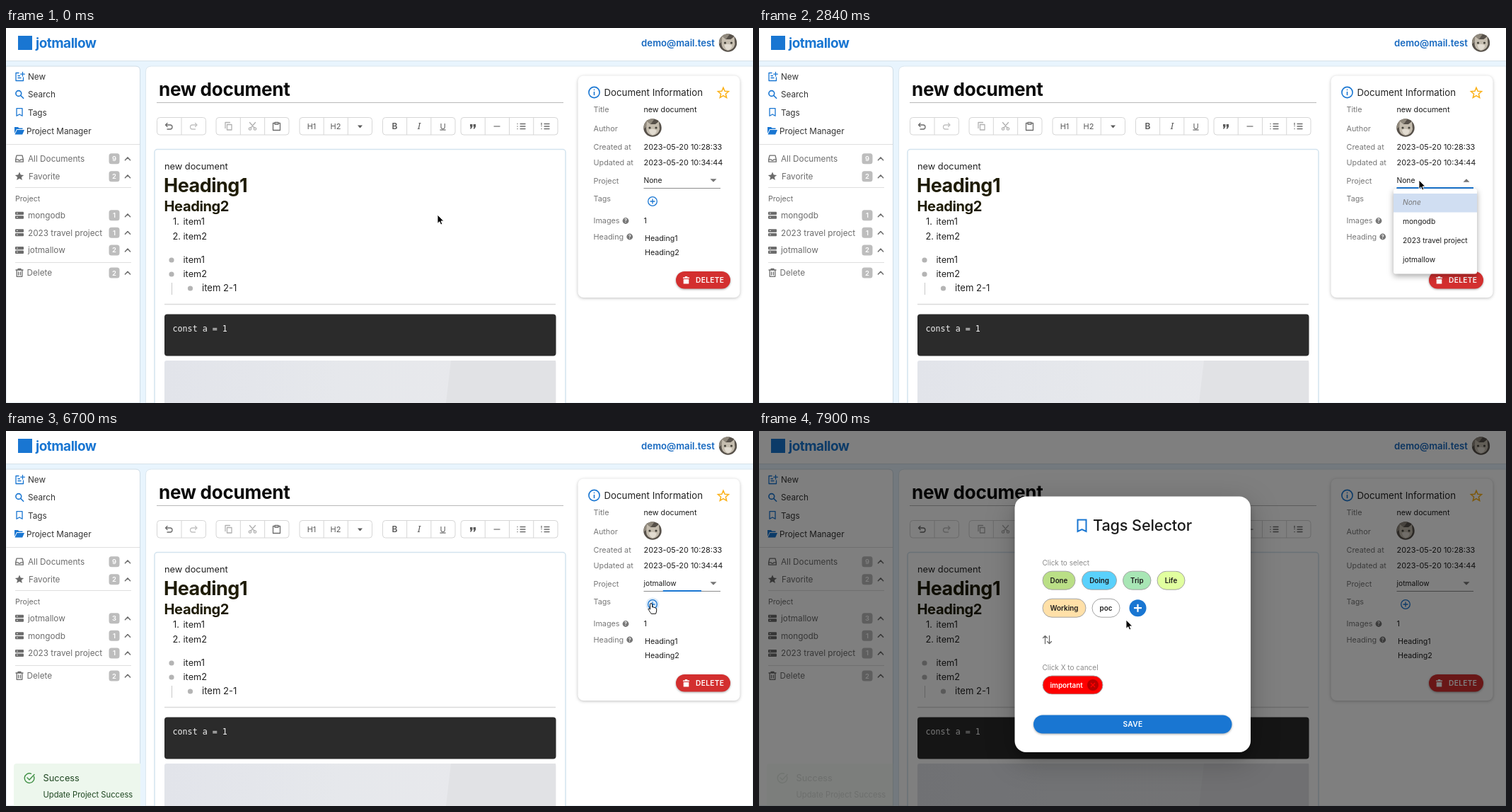
An HTML page that plays this animation: 1056 by 530 pixels, repeating every 8000 ms.

```html
<!DOCTYPE html>
<html lang="en">
<head>
<meta charset="utf-8">
<title>Document editor</title>
<style>
html, body { margin: 0; width: 100%; height: 100%; overflow: hidden; background: #fff; }
svg { display: block; font-family: Inter, "Open Sans", sans-serif; }
.b { font-weight: 700; }
.s { font-weight: 600; }
.side { font-size: 11.75px; fill: #333; }
.dim { fill: #6c6c6c; }
.body { font-size: 12.8px; fill: #222; }
.label { font-size: 10.8px; fill: #777; }
.value { font-size: 10.7px; fill: #1c1c1c; }
.date { font-size: 10.9px; }
.opt { font-size: 10.25px; fill: #1c1c1c; }
.hint { font-size: 10px; fill: #8b8b8b; }
.caps { font-size: 10.2px; font-weight: 600; fill: #fff; letter-spacing: .3px; }
.tool { font-size: 11px; fill: #5a5a5a; }
.line { fill: none; stroke: currentColor; stroke-width: 1.3; stroke-linecap: round; stroke-linejoin: round; }
.blue { color: #1976d2; }
.grey { color: #6c6c6c; }
.mid { text-anchor: middle; }
.lift { filter: drop-shadow(0 1px 1.5px rgba(0,0,0,.35)); }
.card { filter: drop-shadow(0 1px 2px rgba(0,0,0,.25)); }
#caret { transform-origin: 1000px 215.5px; }
#focusLine { transform-origin: 956px 226px; }
#sheet { filter: drop-shadow(0 7px 5px rgba(0,0,0,.2)) drop-shadow(0 10px 20px rgba(0,0,0,.24)); }
#paper { filter: drop-shadow(0 3px 4px rgba(0,0,0,.35)); }
</style>
</head>
<body>
<svg id="stage" width="1056" height="530" viewBox="0 0 1056 530">
  <defs>
    <clipPath id="disc"><circle r="12.7"/></clipPath>
    <linearGradient id="photo"><stop stop-color="#e2e4ea"/><stop offset=".45" stop-color="#e6e8ec"/><stop offset="1" stop-color="#e9e9ec"/></linearGradient>
    <g id="cat" clip-path="url(#disc)">
      <rect x="-13" y="-13" width="26" height="26" fill="#57514a"/>
      <path d="M-13-13H3L-2-6L-13 2Z" fill="#8f887c"/>
      <path d="M-8-9L-3-5H4L9-9L10 2Q8 10 0 11Q-9 9-9 1Z" fill="#c4bcae"/>
      <path d="M-5 3Q1 0 6 4Q4 10 0 10Q-4 9-5 3Z" fill="#e2dcd1"/>
      <circle cx="-4" cy="0" r="1.6" fill="#45423a"/><circle cx="5" cy="0" r="1.6" fill="#45423a"/>
    </g>
    <g id="stack" fill="#6c6c6c"><rect x="-6" y="-5" width="12" height="4.4" rx="1"/><rect x="-6" y=".6" width="12" height="4.4" rx="1"/><path d="M-4-2.8h1.6M-4 2.8h1.6" stroke="#fff"/></g>
    <g id="tray" class="line grey"><path d="M-5.3 1L-4-4.5H4L5.3 1V4.5H-5.3ZM-5.3 1.2H-2Q0 4 2 1.2H5.3"/></g>
    <path id="fav" d="M0-6.2L1.8-2.1L6.2-1.8L2.8 1.1L3.9 5.4L0 3.1L-3.9 5.4L-2.8 1.1L-6.2-1.8L-1.8-2.1Z" fill="#6c6c6c"/>
    <g id="bin" class="line grey"><path d="M-5-4H5M-2-4.2V-5.5H2V-4.2M-3.8-3.8V5.3H3.8V-3.8M-1.4-1V3M1.4-1V3"/></g>
    <path id="up" class="line grey" d="M-3.6 2L0-1.8L3.6 2" style="stroke-width:1.5"/>
    <path id="mark" class="line" d="M-4-5.3H4V5.3L0 3L-4 5.3Z"/>
    <g id="help"><circle r="4.4" fill="#777"/><text class="b mid" y="2.5" font-size="7" fill="#fff">?</text></g>
  </defs>

  <rect width="1056" height="530" fill="#e8f4fd"/>
  <rect width="1056" height="46" fill="#fff"/>
  <path d="M0 46.5H1056" stroke="#d7e2ea"/>
  <rect x="17" y="11" width="20" height="20" fill="#1976d2"/>
  <text class="b" x="42" y="28" font-size="19" letter-spacing="-.5" fill="#1976d2">jotmallow</text>
  <text class="s" x="1002" y="26" font-size="13.2" text-anchor="end" fill="#1769c0">demo@mail.test</text>
  <use href="#cat" x="1020.5" y="21"/>

  <path d="M0 54H183Q189.5 54 189.5 60V530H0Z" fill="#fff" stroke="#cfdce6"/>
  <g class="line blue">
    <path d="M18 63.5H14V74.5H24.5V70M17 70.5H21M17 67.5H19.5M23.5 62.5V68M20.7 65.2H26.3"/>
    <g style="stroke-width:1.6"><circle cx="17.8" cy="92.5" r="3.9"/><path d="M20.8 95.5L24.6 99.3"/></g>
    <use href="#mark" x="19" y="119"/>
  </g>
  <path d="M12 140H17L18.5 141.5H23.5V143H15L12 149ZM15.5 144H26L23.2 150.5H12.5Z" fill="#1976d2"/>
  <g class="side">
    <text x="31" y="73">New</text><text x="31" y="98">Search</text>
    <text x="31" y="123.5">Tags</text><text x="29" y="149.5">Project Manager</text>
  </g>
  <path d="M0 164.5H189M13 225.5H177M13 331.5H177" stroke="#dfdfdf"/>
  <text x="13" y="244.5" font-size="10.6" fill="#6c6c6c">Project</text>
  <g id="rows"></g><g id="listA"></g><g id="listB"></g>

  <path d="M197.5 530V62Q197.5 54 205.5 54H1056V530Z" fill="#fff" stroke="#dbe7ef"/>
  <text class="b" x="216" y="96" font-size="26.1" letter-spacing="-.3" fill="#0a0a0a">new document</text>
  <path d="M213 105.5H788" stroke="#b9b9b9"/>
  <g id="tools" fill="#fff" stroke="#d6d6d6"></g>
  <g class="line grey">
    <path d="M228 134.5L225.5 137L228 139.5M225.8 137H232Q235 137 235 140T232 143H228"/>
    <path stroke="#c2c2c2" style="stroke:#c2c2c2" d="M267.5 134.5L270 137L267.5 139.5M269.7 137H263.5Q260.5 137 260.5 140T263.5 143H267.5"/>
    <g stroke="#b0b0b0"><path d="M312.5 136.5H319V144H312.5ZM310 141.5V133.5H316.5"/>
    <path d="M344.5 133.5L351 141M352.5 133.5L346 141"/><circle cx="345" cy="142.5" r="1.7"/><circle cx="352" cy="142.5" r="1.7"/></g>
    <path d="M380 134.5H377.5V144.5H387.5V134.5H385M380 133.5H385V136H380Z"/>
    <path d="M690 139H698" stroke="#8a8a8a"/>
    <path d="M727 135.5H734M727 139H734M727 142.5H734M723 135.5h.1M723 139h.1M723 142.5h.1M761 135.5H768M761 139H768M761 142.5H768M757 134.5V136.5M757 138.5h.1M757 142.5h.1"/>
  </g>
  <path d="M497 137.5H504L500.5 141.5Z" fill="#5a5a5a"/>
  <g class="tool mid">
    <text x="432" y="143">H1</text><text x="466" y="143">H2</text>
    <text class="s" x="549.5" y="143" font-size="12">B</text>
    <text x="584" y="143" font-family="Noto Serif, serif" font-style="italic" font-size="12">I</text>
    <text x="617.5" y="142.5" text-decoration="underline">U</text>
  </g>
  <path d="M656 136h3.4v3.4l-1.8 3h-1.6l1-2.8h-1zM660.7 136h3.4v3.4l-1.8 3h-1.6l1-2.8h-1z" fill="#5a5a5a"/>

  <rect x="210" y="171.5" width="581" height="380" rx="4" fill="#fff" stroke="#d3e3ee" stroke-width="1.5"/>
  <g class="body">
    <text x="224" y="200">new document</text>
    <text x="236" y="278">1.</text><text x="250.5" y="278">item1</text>
    <text x="235.5" y="298.5">2.</text><text x="250.5" y="298.5">item2</text>
    <text x="250.5" y="332">item1</text><text x="250.5" y="352">item2</text><text x="277" y="372" font-size="13.1">item 2-1</text>
  </g>
  <g class="b" fill="#1f1c07">
    <text x="223" y="231.5" font-size="27" letter-spacing="-.5">Heading1</text>
    <text x="223.5" y="258.5" font-size="20.1" letter-spacing="-.4">Heading2</text>
  </g>
  <g fill="#b4b4b4"><circle cx="234" cy="328" r="3.6"/><circle cx="234" cy="348" r="3.6"/><circle cx="260.5" cy="368" r="3.6"/></g>
  <path d="M234.5 360V377" stroke="#c9c9c9"/>
  <path d="M224 390.5H777" stroke="#dadada" stroke-width="1.5"/>
  <rect x="224" y="404.5" width="553.5" height="59" rx="4" fill="#2b2b2b"/>
  <text x="235.5" y="429" font-family="DejaVu Sans Mono, monospace" font-size="11.7" fill="#f2f2f2">const a = 1</text>
  <path d="M224 530V473Q224 470 227 470H774Q777.5 470 777.5 473V530Z" fill="url(#photo)"/>
  <path d="M629 470H777V530H622Z" fill="#e1e2e5"/>

  <rect class="card" x="808.5" y="67.5" width="229" height="313.5" rx="8" fill="#fff"/>
  <g class="line blue" style="stroke-width:1.6"><circle cx="831.5" cy="91" r="7.6"/><path d="M831.5 90.5V94.5M831.5 87.3v.1"/></g>
  <text x="845.5" y="96" font-size="13.25" fill="#222">Document Information</text>
  <path d="M1014 84.3L1016.1 89.3L1021.5 89.7L1017.4 93.2L1018.7 98.5L1014 95.7L1009.3 98.5L1010.6 93.2L1006.5 89.7L1011.9 89.3Z" fill="none" stroke="#fbb117" stroke-width="1.5"/>
  <g class="label">
    <text x="830.5" y="119">Title</text><text x="830.5" y="145.5">Author</text><text x="830.5" y="172">Created at</text>
    <text x="830.5" y="194">Updated at</text><text x="830.5" y="219.5">Project</text><text x="830.5" y="245">Tags</text>
    <text x="830.5" y="276">Images</text><text x="830.5" y="298.5">Heading</text>
  </g>
  <use href="#help" x="876" y="272.5"/><use href="#help" x="881.7" y="295"/>
  <use href="#cat" x="914" y="141"/>
  <g class="value">
    <text x="901.5" y="119">new document</text><text class="date" x="901.5" y="172">2023-05-20 10:28:33</text>
    <text class="date" x="901.5" y="194">2023-05-20 10:34:44</text><text x="901.5" y="276">1</text>
    <text x="903" y="301">Heading1</text><text x="903" y="321">Heading2</text>
  </g>
  <rect id="focusFill" x="901.5" y="205" width="108.5" height="21" fill="#efefef"/>
  <path d="M901.5 226.5H1010" stroke="#8c8c8c"/>
  <path id="focusLine" d="M901.5 226H1010" stroke="#1976d2" stroke-width="1.8"/>
  <path id="caret" d="M995.5 213.2H1004.5L1000 217.8Z" fill="#757575"/>
  <text id="valueA" class="opt" x="901.5" y="219">None</text>
  <text id="valueB" class="opt" x="901.5" y="219">jotmallow</text>
  <circle id="hover" cx="914" cy="245" r="9.5" fill="#1976d2" fill-opacity=".15"/>
  <g class="line blue"><circle cx="914" cy="245" r="6.3"/><path d="M914 242V248M911 245H917"/></g>
  <rect class="lift" x="947" y="344" width="77" height="24.5" rx="12.25" fill="#d32f2f"/>
  <path d="M957 352.5H966V354H957ZM959.8 351H963.2V352.5H959.8ZM957.7 355H965.3V361.5H957.7Z" fill="#fff"/>
  <text class="caps" x="975" y="360">DELETE</text>

  <g id="menu">
    <rect id="paper" x="897" y="227.5" width="118" height="120" rx="3" fill="#fff"/>
    <rect x="897" y="234" width="118" height="26.5" fill="#d0def2"/>
    <rect id="row" x="897" y="260.5" width="118" height="26.7" fill="#f1f1f1"/>
    <g class="opt">
      <text x="910" y="250" font-style="italic" fill="#777">None</text><text x="910" y="277">mongodb</text>
      <text x="910" y="304">2023 travel project</text><text x="910" y="330.5">jotmallow</text>
    </g>
  </g>

  <g id="toast">
    <path d="M11 530V474Q11 470 15 470H190V530Z" fill="#edf7ed"/>
    <g id="notice" fill="#1e4620">
      <path class="line" color="#3f8f44" style="stroke-width:1.4" d="M39.5 488.5A6.8 6.8 0 1 1 35.5 484.3M30 490L33 493L40 485.5"/>
      <text x="52.5" y="495" font-size="12.8">Success</text>
      <text x="52.5" y="517.5" font-size="11.2">Update Project Success</text>
    </g>
  </g>

  <rect id="shade" width="1056" height="530"/>

  <g id="dialog">
    <g id="sheet">
      <rect id="sheetA" x="361.5" y="110" width="333.5" height="326.5" rx="16" fill="#fff"/>
      <rect id="sheetB" x="361.5" y="92.5" width="333.5" height="361.5" rx="16" fill="#fff"/>
    </g>
    <g id="upper">
      <path class="line blue" style="stroke-width:2;stroke-linejoin:miter" d="M450.5 143H462.5V159.5L456.5 156.5L450.5 159.5Z"/>
      <text x="472" y="158.7" font-size="21.7" font-weight="500" letter-spacing="-.15" fill="#1b1b1b">Tags Selector</text>
      <text class="hint" x="400.5" y="207.5">Click to select</text>
      <g id="chips"></g><g id="chipsA"></g><g id="chipsB"></g>
      <path class="line grey" d="M404.5 318V307M401.5 310L404.5 307L407.5 310M410.5 307V318M407.5 315L410.5 318L413.5 315"/>
      <text class="hint" x="400.5" y="355.5">Click X to cancel</text>
    </g>
    <g id="save">
      <rect class="lift" x="388" y="384" width="280.5" height="26" rx="13" fill="#1976d2"/>
      <text class="caps mid" x="528.5" y="400.5">SAVE</text>
    </g>
  </g>

  <g id="cursor">
    <path id="arrow" d="M0 0V12.3L2.9 9.7L4.7 14L6.8 13.1L5 8.9H8.8Z" stroke="#fff" stroke-width=".9"/>
    <path id="hand" d="M-1.5 1.2Q-1.5-.3 0-.3T1.5 1.2V5Q3.5 4.2 4 5.5Q5.8 5 6.2 6.4Q7.7 6.2 7.7 8V10Q7.5 12 6.5 14.3H.2Q-1 12.5-1.8 11.5Q-3 9.5-4 8.2Q-4.2 6.5-2.6 7L-1.5 8.2Z" fill="#fff" stroke="#111"/>
  </g>
</svg>
<script>
const LOOP = 8000;
const $ = id => document.getElementById(id);
const fill = (id, parts) => $(id).innerHTML = parts.join('');

// Sidebar
const row = ([icon, x, label, y, count]) =>
  `<use href="#${icon}" x="19" y="${y}"/><text class="side dim" x="${x}" y="${y + 4.2}">${label}</text>
  <rect x="145.5" y="${y - 7.5}" width="15" height="15" rx="3.5" fill="#bdbdbd"/>
  <text class="s mid" x="153" y="${y + 3.5}" font-size="9.5" fill="#fff">${count}</text><use href="#up" x="172" y="${y}"/>`;
const projects = list => list.map(([name, n], i) => row(['stack', 31, name, 264.7 + i * 24.6, n]));

fill('rows', [['tray', 31, 'All Documents', 184.7, 9], ['fav', 32, 'Favorite', 209.7, 2], ['bin', 29.5, 'Delete', 346, 2]].map(row));
fill('listA', projects([['mongodb', 1], ['2023 travel project', 1], ['jotmallow', 2]]));
fill('listB', projects([['jotmallow', 3], ['mongodb', 1], ['2023 travel project', 1]]));

// Toolbar groups: left, width, number of buttons
fill('tools', [[213.5, 69, 2], [297, 103, 3], [415, 102.5, 3], [532.5, 102.5, 3], [643, 137, 4]].map(([x, w, n]) => {
  let bars = '';
  for (let i = 1; i < n; i++) bars += `M${x + w * i / n} 126.5V151`;
  return `<rect x="${x}" y="126.5" width="${w}" height="24.5" rx="4"/><path d="${bars}"/>`;
}));

// Tag chips
const chip = ([name, x, w, y, color, ink = '#1b1b1b']) =>
  `<rect x="${x}" y="${y - 13}" width="${w}" height="26" rx="13" fill="${color}" stroke="#a3a3a3"/>
  <text class="s mid" x="${x + w / 2}" y="${y + 3.5}" font-size="9.8" fill="${ink}">${name}</text>`;
const plus = x => `<circle cx="${x}" cy="267.7" r="12" fill="#1976d2"/><path d="M${x - 5.5} 267.7h11M${x} 262.2v11" stroke="#fff" stroke-width="2.2"/>`;

fill('chips', [['Done', 401, 46, 228.7, '#badf86'], ['Doing', 456.5, 49, 228.7, '#5ad1fc'], ['Trip', 514.5, 39.5, 228.7, '#a8e6b5']].map(chip));
fill('chipsA', [
  ...[['Life', 563, 39, 228.7, '#f0e9a6'], ['Working', 401, 61, 267.7, '#f0e6a2'],
    ['important', 471.5, 66, 267.7, '#f00', '#fff'], ['poc', 547, 39, 267.7, 'none']].map(chip),
  plus(612)]);
fill('chipsB', [
  ...[['Life', 563, 39, 228.7, '#e1ff9f'], ['Working', 401, 61, 267.7, '#ffe0a8'], ['poc', 471, 39, 267.7, 'none']].map(chip),
  plus(535.5),
  '<rect x="401" y="363.5" width="85" height="26" rx="13" fill="#f00" stroke="#a3a3a3"/>',
  '<text class="s" x="411.5" y="380" font-size="9.8" fill="#fff">important</text>',
  '<circle cx="472" cy="376.5" r="8" fill="#b80000"/><path d="M469 373.5l6 6m0-6l-6 6" stroke="#f00" stroke-width="1.4"/>']);

// Each property holds its value until the next step.
function play(id, prop, steps) {
  const keys = steps.map(([t, v]) => ({ offset: Math.max(0, t - 4) / LOOP, [prop]: v, easing: 'steps(1, end)' }));
  keys.push({ offset: 1, [prop]: steps[steps.length - 1][1] });
  $(id).animate(keys, { duration: LOOP, iterations: Infinity });
}
const fade = (id, ...steps) => play(id, 'opacity', steps);

const path = [ // time, x, y, pointing hand
  [0, 610, 264], [750, 632, 260], [897, 680, 244], [1043, 720, 225], [1190, 732, 217.5],
  [1490, 752, 208], [1640, 800, 194], [1790, 865, 193], [1940, 920, 208], [2090, 933, 215],
  [3590, 933, 222], [3740, 935, 240, 1], [3890, 938, 266, 1], [4040, 941, 292, 1], [4190, 945, 317, 1],
  [4340, 949, 330.5, 1], [4790, 948, 329.5],
  [5967, 945, 318], [6114, 934, 290], [6261, 920, 260], [6408, 914, 246, 1], [6555, 912, 244, 1], [6850, 911.5, 243.5],
  [7150, 850, 252], [7300, 720, 262], [7450, 590, 268], [7600, 522, 268, 1], [7900, 519, 267]
];
play('cursor', 'transform', path.map(([t, x, y]) => [t, `translate(${x}px, ${y}px)`]));
fade('arrow', ...path.map(p => [p[0], p[3] ? 0 : 1]));
fade('hand', ...path.map(p => [p[0], p[3] ? 1 : 0]));

// Project select
fade('menu', [0, 0], [2390, .25], [2540, .8], [2690, 1], [4640, .5], [4790, 0]);
fade('row', [0, 0], [3890, 1], [4790, 0]);
play('row', 'transform', [[0, 'translateY(0)'], [4040, 'translateY(26.7px)'], [4190, 'translateY(53.4px)']]);
fade('focusFill', [0, 0], [2390, 1], [2840, 0], [4640, 1], [6702, 0]);
play('focusLine', 'transform', [[0, 0], [2390, .6], [2540, 1], [6702, .5], [6850, .03], [7000, 0]].map(([t, k]) => [t, `scaleX(${k})`]));
play('caret', 'transform', [[0, 'rotate(0deg)'], [2540, 'rotate(180deg)'], [4640, 'rotate(0deg)']]);

// Saved state
for (const id of ['valueA', 'listA']) fade(id, [0, 1], [5240, 0]);
for (const id of ['valueB', 'listB']) fade(id, [0, 0], [5240, 1]);
fade('toast', [0, 0], [5240, 1], [7750, .6], [7900, .3]);
fade('notice', [0, 1], [6850, .65], [7000, .55]);
play('notice', 'filter', [[0, 'none'], [6850, 'saturate(.5)']]);

// Tags dialog
fade('hover', [0, 0], [6408, 1], [7150, 0]);
fade('shade', [0, 0], [6850, .08], [7000, .5]);
fade('dialog', [0, 0], [6850, 1]);
play('sheetA', 'fill', [[0, '#ebebeb'], [7000, '#ffffff']]);
for (const id of ['sheetA', 'chipsA']) fade(id, [0, 1], [7900, 0]);
for (const id of ['sheetB', 'chipsB']) fade(id, [0, 0], [7900, 1]);
play('upper', 'transform', [[0, 'translateY(0)'], [7900, 'translateY(-17.5px)']]);
play('save', 'transform', [[0, 'translateY(0)'], [7900, 'translateY(17.5px)']]);
</script>
</body>
</html>
```
